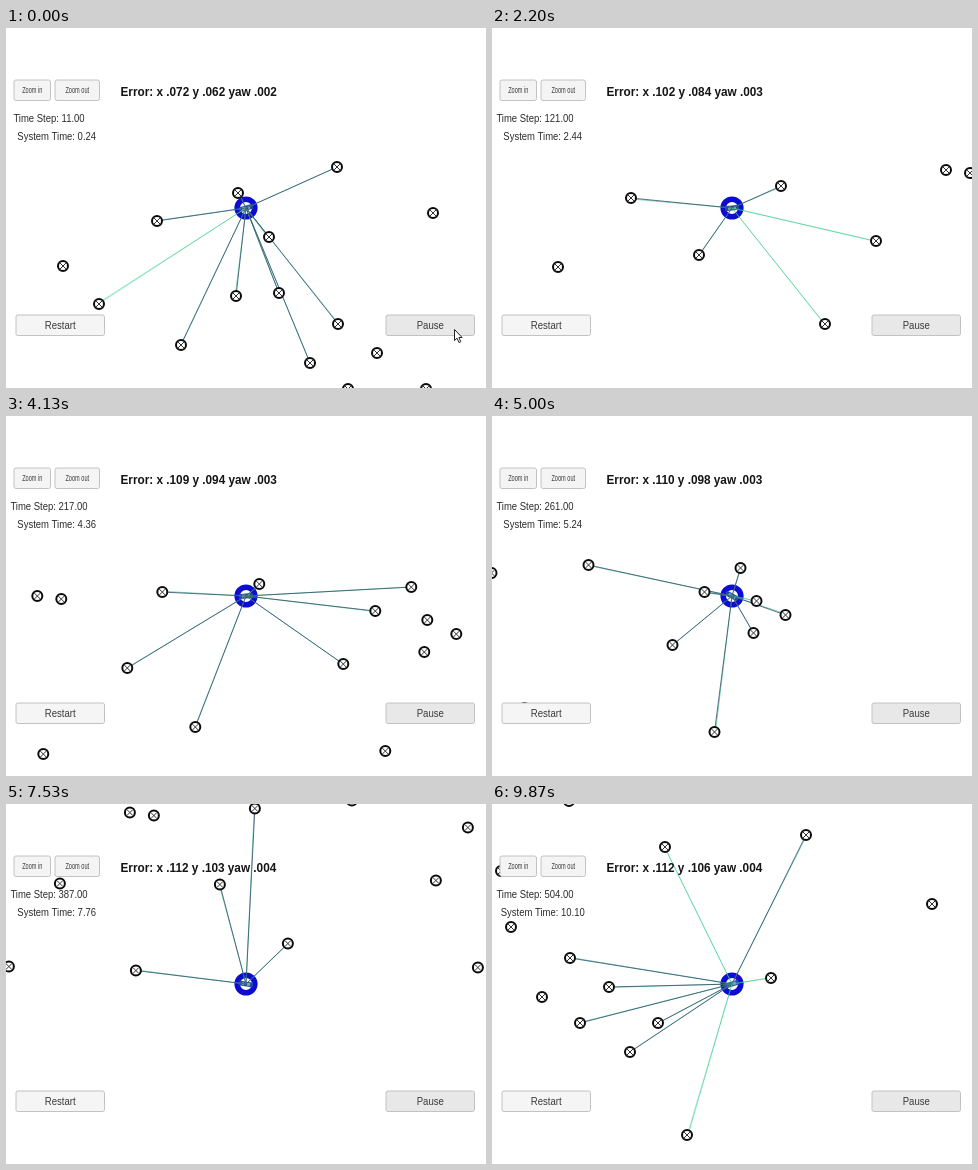
Animation, 480 px wide and 360 px high, one loop 9940 ms. Source, as an HTML page with a canvas:

```html
<!DOCTYPE html>
<html lang="en">
<head>
<meta charset="utf-8">
<title>Particle filter</title>
<style>
  html, body { margin: 0; width: 100%; height: 100%; overflow: hidden; background: #fff; }
  canvas { display: block; width: 480px; height: 360px; }
</style>
</head>
<body>
<canvas id="stage" width="480" height="360"></canvas>
<script>
const ctx = document.getElementById('stage').getContext('2d');
const LOOP = 9940, FPS = 15, RANGE = 180, STEP_MS = 20;
const CAR = { x: 240, y: 180 };
const SANS = '"Liberation Sans", Arial, sans-serif';

// World map in pixels; every sixth landmark gets a bright sensor ray
const landmarks = [
  [93, 276], [331, 139], [232, 165], [151, 193], [263, 209], [57, 238],
  [427, 185], [230, 268], [273, 265], [175, 317], [304, 335], [332, 296],
  [745, 159], [371, 325], [342, 361], [420, 361], [650, 104], [500, 116],
  [694, 242], [568, 173], [815, 88], [839, 91], [1037, 76], [940, 84],
  [533, 316], [905, 160], [973, 219], [821, 246], [1153, 103], [1189, 79],
  [1205, 112], [1234, 126], [1121, 156], [1202, 144], [1163, 243], [392, 390],
  [449, 473]
];

// Drive: time, x, y; the first point lies before the loop and sets the starting pace
const route = [
  [-220, -17, 5], [0, 0, 0], [2200, 361, -54], [3330, 615.5, -74], [5000, 940.5, -73],
  [5500, 1010, -20], [6000, 965, 52.5], [6470, 885.5, 82], [8600, 488, 68], [9870, 254, 142]
];

const secant = (i, col) =>
  (route[i + 1][col] - route[i][col]) / (route[i + 1][0] - route[i][0]);

function slope(i, col) {
  if (i === 0) return secant(0, col);
  if (i === route.length - 1) return secant(i - 1, col);
  const h0 = route[i][0] - route[i - 1][0], h1 = route[i + 1][0] - route[i][0];
  return (h1 * secant(i - 1, col) + h0 * secant(i, col)) / (h0 + h1);
}

// Cubic Hermite position along the route
function along(t, col) {
  let i = 0;
  while (i < route.length - 2 && t >= route[i + 1][0]) i++;
  const a = route[i], b = route[i + 1], h = b[0] - a[0];
  const u = (t - a[0]) / h, v = 1 - u;
  return v * v * (1 + 2 * u) * a[col] + u * u * (3 - 2 * u) * b[col] +
    h * u * v * (v * slope(i, col) - u * slope(i + 1, col));
}

const noise = n => {
  const s = Math.sin(n * 12.9898) * 43758.5453;
  return s - Math.floor(s) - 0.5;
};

function line(x1, y1, x2, y2, color, width = 1) {
  ctx.strokeStyle = color;
  ctx.lineWidth = width;
  ctx.beginPath();
  ctx.moveTo(x1, y1);
  ctx.lineTo(x2, y2);
  ctx.stroke();
}

function ring(x, y, r, color, width) {
  ctx.beginPath();
  ctx.arc(x, y, r, 0, Math.PI * 2);
  ctx.fillStyle = '#fff';
  ctx.fill();
  ctx.strokeStyle = color;
  ctx.lineWidth = width;
  ctx.stroke();
}

function text(str, x, y, size, { weight = 'normal', align = 'center', color = '#2a2a2a', squeeze = 0.94 } = {}) {
  ctx.save();
  ctx.translate(x, y);
  ctx.scale(squeeze, 1);
  ctx.font = `${weight} ${size}px ${SANS}`;
  ctx.textAlign = align;
  ctx.fillStyle = color;
  ctx.fillText(str, 0, 0);
  ctx.restore();
}

function button(label, x, w, y, size, fill, squeeze) {
  const h = 20.5;
  ctx.beginPath();
  ctx.roundRect(x, y, w, h, 2);
  ctx.fillStyle = fill;
  ctx.fill();
  ctx.strokeStyle = '#c2c2c2';
  ctx.lineWidth = 1;
  ctx.stroke();
  text(label, x + w / 2, y + h / 2 + size * 0.36, size, { color: '#3a3a3a', squeeze });
}

function landmark({ x, y }) {
  ring(x, y, 5, '#0a0a0a', 2);
  line(x - 3, y - 3, x + 3, y + 3, '#333');
  line(x - 3, y + 3, x + 3, y - 3, '#333');
}

// Sensor reading in green, the particle's own estimate in navy
function ray({ x, y, bright }, seed) {
  const dx = noise(seed) * 2, dy = noise(seed + 7) * 2;
  line(CAR.x, CAR.y, x + dx, y + dy, bright ? '#48ee98' : '#5fd0a8', 0.8);
  ctx.globalAlpha = bright ? 0.2 : 0.85;
  line(CAR.x, CAR.y, x, y, '#2c4468', 0.9);
  ctx.globalAlpha = 1;
}

function car(heading) {
  ring(CAR.x, CAR.y, 8.8, '#0d0dd2', 5.6);
  ctx.save();
  ctx.translate(CAR.x, CAR.y);
  ctx.rotate(heading);
  ctx.fillStyle = '#2349a0';
  ctx.fillRect(-7, -2.5, 14, 5);
  ctx.fillStyle = '#7fa5a8';
  ctx.fillRect(-4, -1.5, 3, 3);
  ctx.fillRect(2, -1.5, 2, 3);
  ctx.restore();
}

function cursor(x, y) {
  ctx.beginPath();
  [[0, 0], [0, 11], [2.5, 8.7], [4.5, 13], [6.3, 12.2], [4.4, 8], [7.6, 8]]
    .forEach(([dx, dy]) => ctx.lineTo(x + dx, y + dy));
  ctx.closePath();
  ctx.fillStyle = '#fff';
  ctx.fill();
  ctx.strokeStyle = '#222';
  ctx.lineWidth = 1;
  ctx.stroke();
}

// Mean errors, in thousandths, level off towards a limit
function error(t, first, limit, tau) {
  const value = limit - (limit - first) * Math.exp(-t / tau);
  return '.' + String(Math.round(value)).padStart(3, '0');
}

function readout(t) {
  const step = 11 + Math.floor(t / STEP_MS);
  const x = error(t, 72, 112, 1600), y = error(t, 62, 108.1, 3400), yaw = error(t, 2, 4, 4500);
  text(`Error: x ${x} y ${y} yaw ${yaw}`, 114.5, 68.2, 12.4,
    { weight: 'bold', align: 'left', color: '#151515', squeeze: 0.95 });
  text(`Time Step: ${step.toFixed(2)}`, 43, 93.6, 10.1);
  text(`System Time: ${((step + 1) * STEP_MS / 1000).toFixed(2)}`, 50.7, 111.6, 10.1);
}

function draw(t) {
  ctx.fillStyle = '#fff';
  ctx.fillRect(0, 0, 480, 360);

  const cx = along(t, 1), cy = along(t, 2);
  const seen = landmarks.map(([x, y], i) => ({ x: x - cx, y: y - cy, bright: i % 6 === 0 }));

  car(Math.atan2(along(t + 10, 2) - cy, along(t + 10, 1) - cx));
  seen.forEach((m, i) => {
    if (Math.hypot(m.x - CAR.x, m.y - CAR.y) < RANGE) ray(m, i * 31 + t);
  });
  seen.forEach(landmark);

  readout(t);
  button('Zoom in', 8, 36.5, 52, 9, '#f4f4f4', 0.62);
  button('Zoom out', 49, 44.5, 52, 9, '#f4f4f4', 0.62);
  button('Restart', 10, 88.5, 287, 10.2, '#f5f5f5');
  button('Pause', 380, 88.5, 287, 10.2, '#e8e8e8');
  if (t < 700) cursor(448.5, 301.5);
}

const start = performance.now();
function tick() {
  const t = Math.max(0, performance.now() - start) % LOOP;
  const n = Math.min(148, Math.floor((t + 5) * FPS / 1000));
  draw(Math.round(n * 100 / FPS) * 10);
  requestAnimationFrame(tick);
}
tick();
</script>
</body>
</html>
```
